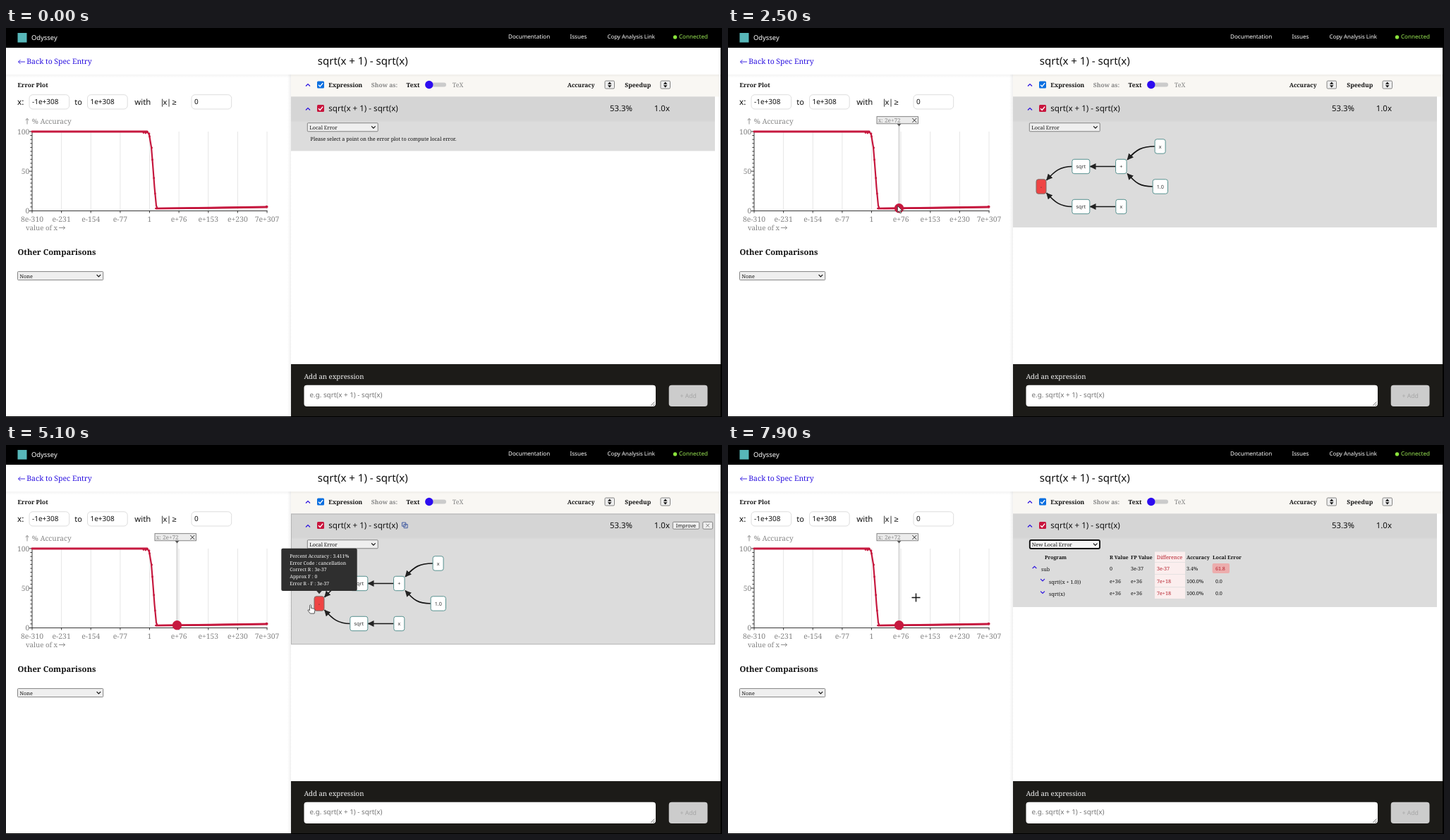
Recreate the animation shown at these times as an HTML page. Size 1015x552 px, loop 8000 ms.

```html
<!DOCTYPE html>
<html lang="en">
<head>
<meta charset="utf-8">
<title>Odyssey</title>
<style>
html, body { margin: 0; width: 100%; height: 100%; overflow: hidden; background: #fff; }
svg { display: block; width: 1015px; height: 552px; }
text { font-family: "Noto Serif", serif; text-rendering: geometricPrecision; white-space: pre; }
.sans { font-family: "Noto Sans", sans-serif; }
.b { font-weight: 700; }
.m { font-weight: 500; }
</style>
</head>
<body>
<svg id="stage" viewBox="0 0 1015 552">
  <defs>
    <linearGradient id="down" x2="0" y2="1"><stop stop-color="#000" stop-opacity=".1"/><stop offset="1" stop-color="#000" stop-opacity="0"/></linearGradient>
    <linearGradient id="left" x1="1" x2="0"><stop stop-color="#000" stop-opacity=".1"/><stop offset="1" stop-color="#000" stop-opacity="0"/></linearGradient>
    <marker id="head" viewBox="0 0 9 9" refX="8.5" refY="4.5" markerWidth="9" markerHeight="9" markerUnits="userSpaceOnUse" orient="auto">
      <path d="M0 0L9 4.5L0 9Z" fill="#222"/>
    </marker>
  </defs>
</svg>
<script>
const NS = "http://www.w3.org/2000/svg";
const LOOP = 8000, STEP = 100;
const RED = "#c6193f", BLUE = "#2a10e0", GREY = "#858585";
const stage = document.getElementById("stage");
let layer = stage;

function add(tag, attrs, content) {
  const el = document.createElementNS(NS, tag);
  for (const k in attrs) el.setAttribute(k, attrs[k]);
  if (content !== undefined) el.textContent = content;
  layer.appendChild(el);
  return el;
}
const rect = (x, y, x2, y2, fill, more) =>
  add("rect", { x, y, width: x2 - x, height: y2 - y, fill, ...more });
const line = (d, stroke, width = 1, more) =>
  add("path", { d, stroke, "stroke-width": width, fill: "none", ...more });
const solid = (d, fill) => add("path", { d, fill });
const disc = (cx, cy, r, fill) => add("circle", { cx, cy, r, fill });
const text = (x, y, size, str, fill = "#111", cls = "", more) =>
  add("text", { x, y, "font-size": size, fill, class: cls, ...more }, str);
const sans = (x, y, size, str, fill, cls = "", more) =>
  text(x, y, size, str, fill, "sans " + cls, more);
const mid = { "text-anchor": "middle" };
const chevron = (x, y, dir, color = BLUE, r = 3) =>
  line(`M${x - r} ${y - dir * r / 2}L${x} ${y + dir * r / 2}L${x + r} ${y - dir * r / 2}`, color, 1.2);
const cross = (x, y, r, color, width) =>
  line(`M${x - r} ${y - r}l${2 * r} ${2 * r}M${x + r} ${y - r}l${-2 * r} ${2 * r}`, color, width);
const grip = (x, y) => line(`M${x} ${y}l5.5 -5.5M${x + 3} ${y}l2.5 -2.5`, "#555", .8);

// Groups shown only during the given time spans
const timed = [];
function group(spans, draw) {
  const outer = layer;
  layer = add("g", {});
  timed.push({ el: layer, spans });
  draw();
  layer = outer;
}

function check(x, y, color) {
  rect(x, y, x + 10, y + 10, color, { rx: 1.5 });
  line(`M${x + 2} ${y + 5.2}l2.2 2.2l4 -4.8`, "#fff", 1.4);
}
function select(x, y, x2, label, focus) {
  rect(x, y, x2, y + 12, focus ? "#f4f4f4" : "#efefef",
    { stroke: focus ? "#101010" : "#767676", "stroke-width": focus ? 1.9 : .9, rx: focus ? 2 : 1 });
  text(x + 3, y + 9, 7.25, label);
  chevron(x2 - 6.3, y + 6, 1, "#111", 2.8);
}
function sorter(x) {
  rect(x, 75, x + 13.5, 86, "#efefef", { stroke: "#777", "stroke-width": .9, rx: 1.5 });
  const c = x + 6.7;
  solid(`M${c - 2.8} 79.8h5.6l-2.8 -3.2ZM${c - 2.8} 81.2h5.6l-2.8 3.2Z`, "#111");
}

function frameUi() {
  rect(0, 66, 404, 551, "#fff");
  rect(0, 66, 404, 71, "url(#down)", { opacity: .45 });
  rect(399, 66, 404, 551, "url(#left)", { opacity: .6 });
  rect(0, 0, 1015, 28, "#000");
  rect(16.5, 7, 29.5, 20.5, "#57b7b9");
  sans(36, 16.8, 9.4, "Odyssey", "#fff", "m");
  sans(712, 15.4, 8.1, "Documentation", "#fff", "m");
  sans(799.5, 15.4, 8.1, "Issues", "#fff", "m");
  sans(852.5, 15.4, 7.85, "Copy Analysis Link", "#fff", "m");
  disc(948.5, 13, 2.7, "#8be33c");
  sans(954, 15.4, 8.1, "Connected", "#9dec55", "m");

  line("M27 48H17.5M20.5 45l-3 3l3 3", BLUE, .9);
  text(29.3, 51.3, 10.45, "Back to Spec Entry", BLUE);
  sans(441.8, 51.6, 15.05, "sqrt(x + 1) - sqrt(x)", "#111", "m");
}

function plot() {
  text(16.5, 84, 8.45, "Error Plot", "#111", "b");
  sans(16, 108.5, 11.8, "x:");
  sans(97.3, 108.5, 11, "to");
  sans(182.3, 108.5, 11.4, "with");
  sans("218.5 222.5 228 235.5", 108.5, 11, "|x|≥");
  [[33, "-1e+308"], [115.5, "1e+308"], [263, "0"]].forEach(([x, s]) => {
    rect(x, 94.7, x + 56.7, 115, "#fff", { stroke: "#ddd", rx: 5 });
    sans(x + 4, 108.4, 10, s);
  });

  line("M30 136.5V128.5M27.8 131l2.2 -2.6l2.2 2.6", GREY, .9);
  text(36.8, 136, 10.1, "% Accuracy", GREY);
  const ticks = ["8e-310", "e-231", "e-154", "e-77", "1", "e+76", "e+153", "e+230", "7e+307"];
  ticks.forEach((s, i) => {
    const x = 37 + i * 41.63;
    if (i) line(`M${x} 147V259.5`, "#e6e6e6");
    line(`M${x} 259.5v3`, "#222", .9);
    text(x, 274.8, 10.4, s, GREY, "", mid);
  });
  for (let i = 0; i <= 20; i++)
    line(`M37 ${259.5 - i * 5.63}h${i % 10 ? -2.6 : -4}`, "#222", .9);
  [100, 50, 0].forEach((v, i) =>
    text(33.3, 150.7 + i * 56.3, 10.3, v, GREY, "", { "text-anchor": "end" }));
  line("M37 146.5V259.5H370.5", "#222", .9);
  text(28, 287, 9.7, "value of x", GREY);
  line("M75 283.5h8.5M81 281l2.6 2.5l-2.6 2.5", GREY, .9);

  line("M37 147H195L201 148.2L203 151.5L206 169L208 193L210.5 226L213 252L214.5 256L290 255.2L370 254",
    RED, 2.2, { "stroke-linejoin": "round" });
  line("M37 147H200M212.5 256.1L290 255.3L370 254", RED, 2.9, { "stroke-linecap": "round" });
  [[195, 148.6], [198, 149], [200.5, 147.6], [203, 150], [203.6, 154], [206.6, 170],
   [207.5, 187], [209.8, 213], [211.3, 235]].forEach(p => disc(...p, 1.4, RED));
  disc(369.5, 253.6, 1.8, RED);

  text(16.5, 321.6, 11.25, "Other Comparisons", "#111", "b");
  select(16.5, 345.6, 137.7, "None");
}

function pointMark() {
  line("M242.5 138V250", "#dedede", 2.6);
  rect(211, 125.7, 269.5, 135.8, "#ececec", { stroke: "#777", "stroke-width": .9 });
  solid("M239.7 136h5.6l-2.8 3.4Z", "#555");
  text(212.8, 133.7, 8.2, "x: 2e+72", "#888");
  cross(264.3, 131, 3, "#222", .9);
  disc(242.5, 255.7, 6.7, RED);
}

let panel, outline;
function expression() {
  rect(404, 66, 1013, 97.5, "#f9f7f3");
  rect(404, 66, 1013, 70, "url(#down)", { opacity: .4 });
  chevron(428, 81, -1);
  check(441, 75.5, "#0b6fe0");
  text(457.3, 84.3, 8.5, "Expression", "#111", "b");
  text(517.8, 84.3, 8.5, "Show as:", GREY, "b");
  text(567.4, 84.3, 8.55, "Text", "#111", "b");
  rect(597, 77.5, 624, 83.5, "#cbcbcb", { rx: 3 });
  disc(599.8, 80.5, 5.7, "#2d0cf0");
  text(632.8, 84.3, 8.9, "TeX", GREY);
  text(795.8, 84.3, 8.3, "Accuracy", "#111", "b");
  sorter(849);
  text(877.3, 84.3, 8.5, "Speedup", "#111", "b");
  sorter(928);

  panel = rect(404, 97.5, 1005, 174.5, "#dcdcdc");
  rect(404, 97.5, 1005, 131, "#d5d5d5");
  rect(404, 131, 1005, 134, "url(#down)", { opacity: .35 });
  outline = rect(404.5, 98, 1004.7, 174, "none", { stroke: "#b4b4b4" });
  chevron(428, 115, -1);
  check(441, 109, "#c8143c");
  sans(457.3, 118, 11.6, "sqrt(x + 1) - sqrt(x)");
  sans(856, 118, 11.4, "53.3%");
  sans(918.8, 118, 11.4, "1.0x");
}

function rowTools() {
  line("M561.5 110h5.2v5.2h-5.2ZM564 112.5h5.2v5.2h-5.2Z", "#33509c", .9);
  const edge = { stroke: "#777", "stroke-width": .9, rx: 1.5 };
  rect(945.3, 109.2, 982.7, 119.2, "#efefef", edge);
  sans(964, 116.6, 7.2, "Improve", "#111", "", mid);
  rect(987.8, 109.2, 1001.7, 119.2, "#efefef", edge);
  cross(994.7, 114.2, 2.4, "#666", .8);
}

function graph() {
  ["M605 168C587 168 579 172 566 187", "M602 225C584 225 578 220 566 206.5",
   "M488 196.5C471 196.5 463 203 451.5 216", "M488 253.5C471 253.5 463 247 451.5 234",
   "M549.5 196.5H513", "M549.5 253.5H513"].forEach(d =>
    line(d, "#151515", 1.7, { "marker-end": "url(#head)" }));
  [[444, 225, 14, "-"], [500.3, 196.5, 25, "sqrt"], [557.3, 196.5, 15.5, "+"], [612.6, 168, 15, "x"],
   [612.8, 225, 21.3, "1.0"], [500.3, 253.5, 25, "sqrt"], [557.3, 253.5, 15, "x"]].forEach(([x, y, w, s], i) => {
    rect(x - w / 2, y - 10.2, x + w / 2, y + 10.2, i ? "#fff" : "#ef4444",
      { stroke: i ? "#57918f" : "#7d6a66", rx: 3 });
    sans(x, y + 2.6, 7.2, s, "#333", "", mid);
  });
}

function tip() {
  rect(390.3, 146.8, 497.7, 207, "#2f2f2f", { rx: 2 });
  solid("M440 206.8h8l-4 4.4Z", "#2f2f2f");
  ["Percent Accuracy : 3.411%", "Error Code : cancellation", "Correct R : 3e-37",
   "Approx F : 0", "Error R - F : 3e-37"].forEach((s, i) =>
    text(402.2, 159.8 + i * 9.75, 6.75, s, "#fff"));
}

function table() {
  [[151.5, 166], [166.7, 183.3], [184, 201.4], [202.1, 218]].forEach(([a, b]) =>
    rect(605, a, 648, b, "#fbeeee"));
  [[449, "Program"], [541, "R Value"], [571, "FP Value"], [650, "Accuracy"], [687, "Local Error"]]
    .forEach(([x, s]) => text(x, 161.6, 7.03, s, "#111", "b"));
  text(607.8, 161.6, 7.35, "Difference", "#b5202c");
  rect(686.6, 168, 711, 182, "#ecadad", { rx: 2 });
  [[444, 178.7, "sub", "0", "3e-37", "3e-37", "3.4%", "61.8"],
   [455, 196.5, "sqrt((x + 1.0))", "e+36", "e+36", "7e+18", "100.0%", "0.0"],
   [455, 214, "sqrt(x)", "e+36", "e+36", "7e+18", "100.0%", "0.0"]].forEach(([x, y, name, ...cells], i) => {
    text(x, y, 7.2, name);
    chevron(i ? 446 : 434.5, y - 5, i ? 1 : -1, BLUE, 2.9);
    cells.forEach((s, c) => text([541, 571, 608, 650, 691][c], y - 1, 7.2, s,
      c == 2 || (c == 4 && !i) ? "#b5202c" : "#111"));
  });
}

function footer() {
  rect(404, 477, 1013, 551, "#1c1b18");
  text(422.5, 497.5, 9.65, "Add an expression", "#f4f4f4");
  rect(422.5, 506.7, 921, 537, "#fff", { rx: 4 });
  sans(430.5, 524, 9.83, "e.g. sqrt(x + 1) - sqrt(x)", "#757575");
  grip(914, 536);
  rect(939.7, 506.7, 994.5, 537, "#cccccc", { rx: 4 });
  sans(967.2, 525, 8.6, "+ Add", "#a5a5a5", "m", mid);
  rect(1013, 0, 1015, 552, "#000");
  rect(0, 551, 1015, 552, "#000");
}

frameUi();
plot();
group([[1800, LOOP]], pointMark);
expression();
group([[3700, 7200]], rowTools);
group([[0, 6800]], () => select(427.3, 134.8, 527.2, "Local Error"));
group([[6800, LOOP]], () => select(427.8, 135, 527, "New Local Error", true));
group([[0, 1800]], () => text(431.6, 160.3, 7.21, "Please select a point on the error plot to compute local error."));
group([[1800, 2000]], () => grip(991, 264));
group([[2000, 6800]], graph);
group([[4100, 5300]], tip);
group([[6800, 7000]], () => text(431.6, 160.3, 7.21, "No local error computed for this expression. Select a point to compute."));
group([[7000, LOOP]], table);
footer();

// Cursor shapes, each with its hot spot at 0,0
function shape(draw) {
  const outer = layer;
  const g = layer = add("g", {});
  draw();
  layer = outer;
  return g;
}
const pen = { fill: "#fff", stroke: "#333", "stroke-width": .8, "stroke-linejoin": "round" };
const cursors = {
  arrow: shape(() => add("path", { d: "M.4 .4V9.6L2.6 7.6L4.1 11L5.6 10.3L4.2 7H7Z", ...pen })),
  plus: shape(() => {
    line("M-6.5 0H6.5M0 -6.5V6.5", "#fff", 2.4);
    line("M-6 0H6M0 -6V6", "#111", 1.4);
  }),
  hand: shape(() => add("path", {
    d: "M-1 1Q0 -.6 1 1V5L5 5.8Q6.5 6.2 6.4 8L5.6 12.6H-.2L-3.4 8.6Q-3.6 7 -2.2 7.4L-1 8.4Z", ...pen }))
};

// time, x, y, shape used from that time on
const path = [
  [700, 249.5, 444.5, "arrow"], [800, 249.5, 444.5, "arrow"], [1000, 246, 405, "arrow"],
  [1200, 236, 325, "arrow"], [1400, 229, 266, "plus"], [1700, 241, 254, "plus"],
  [1800, 240, 252, "arrow"], [2900, 240, 252, "arrow"], [3100, 270, 248, "plus"],
  [3400, 345, 239, "plus"], [3500, 378, 236, "arrow"], [3600, 407, 234, "arrow"],
  [3900, 436, 229, "arrow"], [4100, 441, 226, "hand"], [4400, 439, 225, "hand"],
  [5000, 439, 225, "hand"], [5100, 431.5, 226.5, "hand"], [5200, 434, 215, "arrow"],
  [5500, 446, 160, "arrow"], [5800, 450, 139, "arrow"], [6200, 450, 139, "arrow"],
  [6400, 450, 200, "arrow"], [6500, 450.5, 226.5, "arrow"], [7000, 450.5, 226.5, "arrow"],
  [7300, 450.5, 241, "arrow"], [7600, 450.5, 241, "arrow"], [7700, 398, 232, "arrow"],
  [7800, 312, 221, "plus"], [7900, 266.5, 216.5, "plus"]
];
const bottoms = [[0, 174.5], [1800, 276.5], [2000, 283], [6800, 174.5], [7000, 230]];

function pose(t) {
  for (const { el, spans } of timed)
    el.style.display = spans.some(([a, b]) => t >= a && t < b) ? "" : "none";

  const bottom = bottoms.filter(b => b[0] <= t).pop()[1];
  panel.setAttribute("height", bottom - 97.5);
  outline.setAttribute("height", bottom - 98.3);
  outline.style.display = t >= 3600 && t < 7200 ? "" : "none";

  const i = path.filter(p => p[0] <= t).length - 1;
  for (const k in cursors) cursors[k].style.display = i >= 0 && path[i][3] === k ? "" : "none";
  if (i < 0) return;
  const a = path[i], b = path[i + 1] || a;
  const f = b === a ? 0 : (t - a[0]) / (b[0] - a[0]);
  cursors[a[3]].setAttribute("transform",
    `translate(${a[1] + (b[1] - a[1]) * f} ${a[2] + (b[2] - a[2]) * f})`);
}

const start = performance.now();
function tick() {
  const t = (performance.now() - start) % LOOP;
  pose(Math.floor(t / STEP) * STEP);
  requestAnimationFrame(tick);
}
pose(0);
requestAnimationFrame(tick);
</script>
</body>
</html>
```
